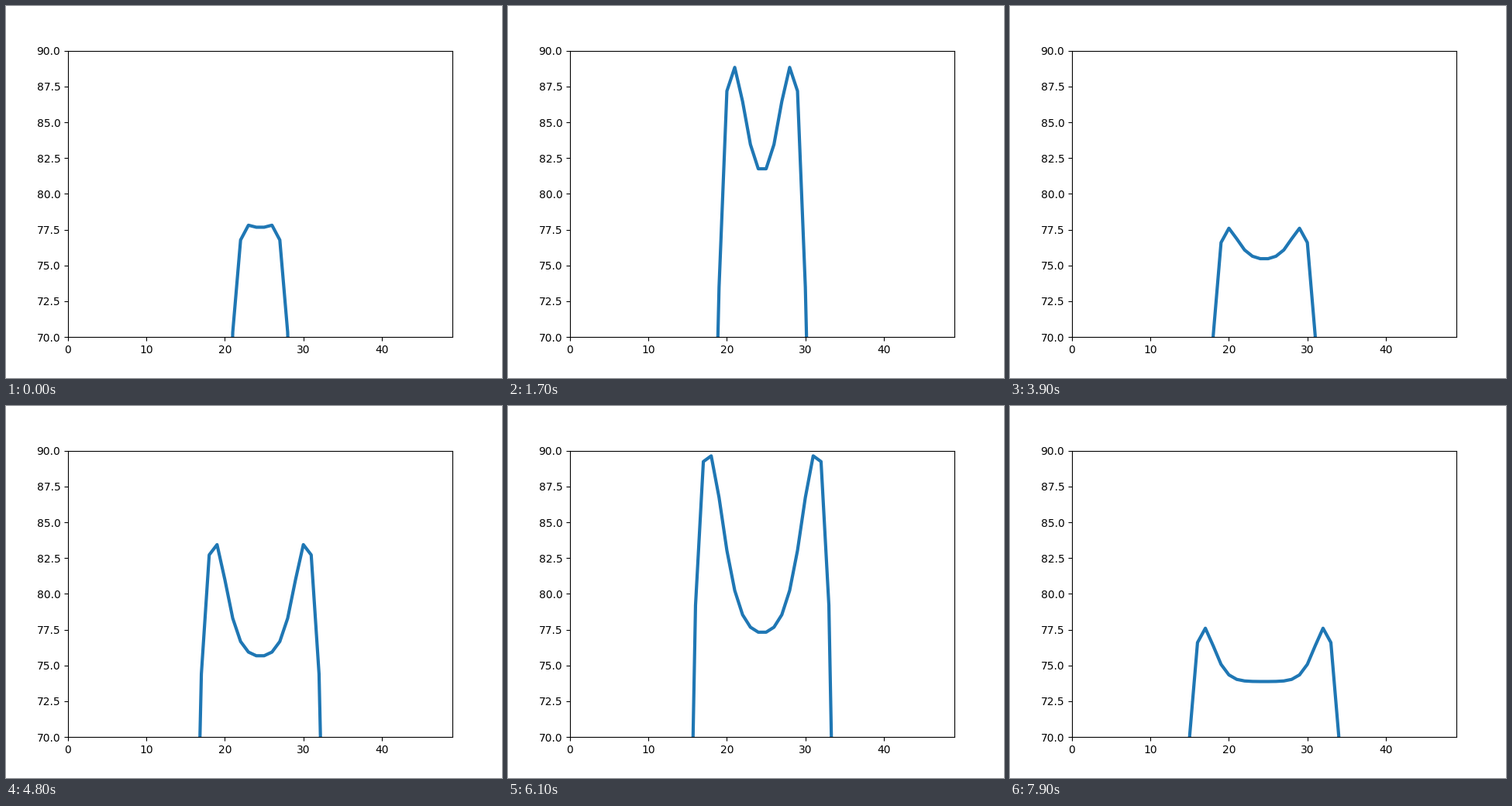
A matplotlib script that plays this animation: 640 by 480 pixels, repeating every 8000 ms.

```python
import numpy as np
import matplotlib.pyplot as plt
from matplotlib.animation import FuncAnimation

N, HALF, BASE = 50, 25, 50.0
FRAMES = 80
FIRST, GAP = 4, 14.26        # first spike and spacing of spikes, in frames


def pulse(t, lead, lag):
    """Swell up to 1 at t = 0, then drop to nothing after lag frames."""
    if t < 0:
        return np.exp(-abs(t / lead) ** 2.2)
    return max(0, 1 - t / lag) ** 2.6


def plateau(front, edge, rim, crest, floor, decay):
    """Left half: steep edge, rim and crest, then tails from both crests."""
    top = front + 2
    x = np.arange(HALF - top)
    far = N - 1 - 2 * top - x
    tails = np.exp(-decay * x ** 1.5) + np.exp(-decay * far ** 1.5)
    y = np.full(HALF, BASE)
    y[front:top] = edge, rim
    y[top:] = floor + (crest - floor) * tails
    return y


def profile(i):
    n = max(0, round((i - FIRST) / GAP))
    t = i - FIRST - round(n * GAP)
    swell, inner = pulse(t, 2, 4), pulse(t, 2.2, 2.2)

    # Each spike pushes the front one cell outwards.
    front = 20 - n
    before = front + 1 if t < 0 else front
    floor = 76.8 - 0.037 * i + 2.4 * inner
    decay = 0.4 - 0.14 * inner
    height = 89.2 + 5 * np.exp(-i / 25)

    low = plateau(before, 70.1, 76.6, 77.6, floor, decay)
    high = plateau(front, 79.2, height - 0.4, height, floor, decay)
    y = low + swell * (high - low)
    return np.concatenate([y, y[::-1]])


fig, ax = plt.subplots(figsize=(6.4, 4.8), dpi=100)
ax.set_xlim(0, N - 1)
ax.set_ylim(70, 90)
line, = ax.plot(np.arange(N), profile(0), lw=3)


def update(i):
    line.set_ydata(profile(i))
    return line,


anim = FuncAnimation(fig, update, frames=FRAMES, interval=100,
                     repeat=True, repeat_delay=0)
plt.show()
```
